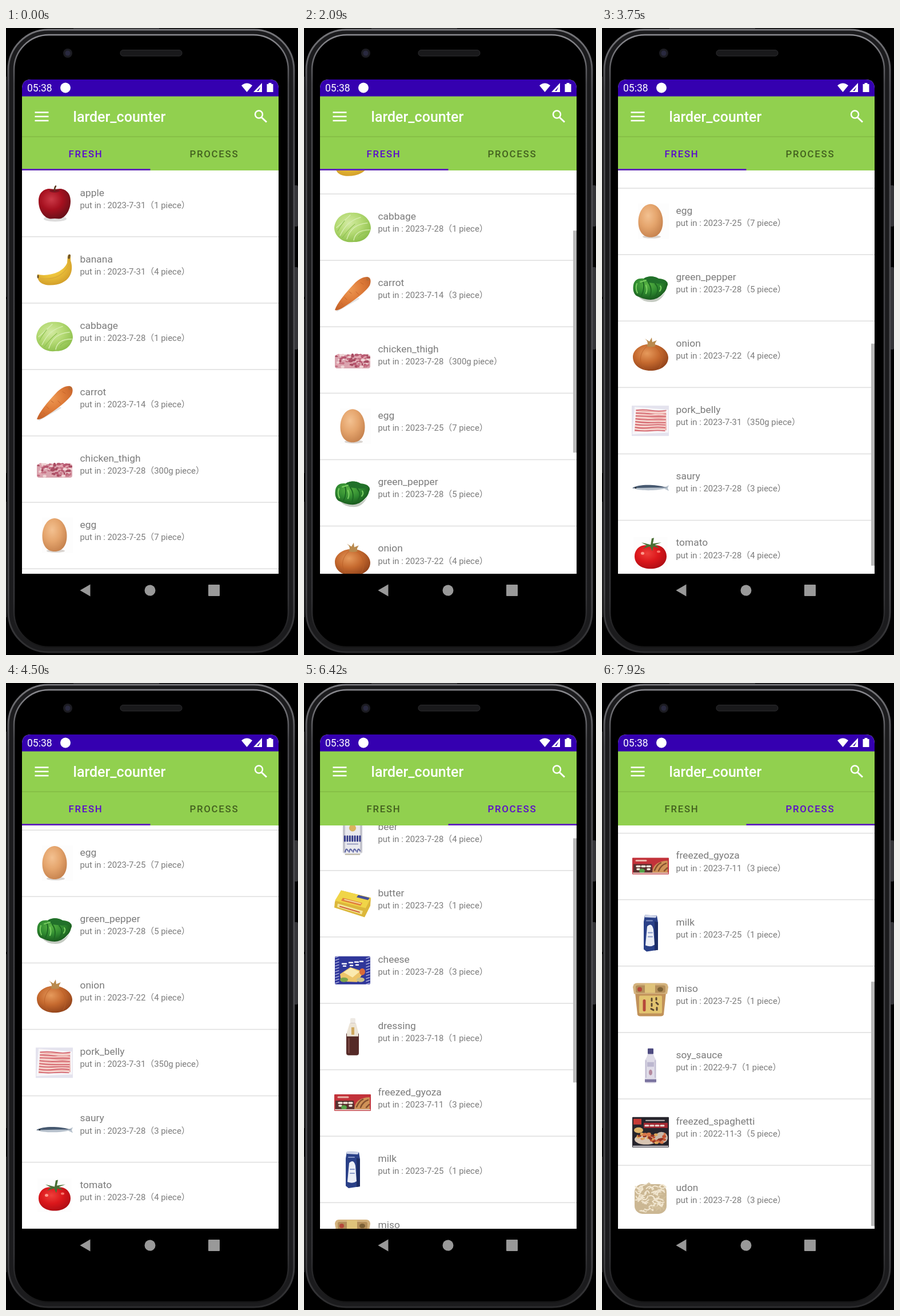
An HTML page for the animation above (8000 ms loop, 511x1096 px).

```html
<!DOCTYPE html>
<html lang="en">
<head>
<meta charset="utf-8">
<title>larder_counter</title>
<style>
  html, body { margin: 0; width: 100%; height: 100%; overflow: hidden; background: #000; }
  svg { display: block; width: 100%; height: 100%; }
  text { font-family: Roboto, "Noto Sans CJK JP", "Noto Sans CJK", sans-serif; }
  .name { font-size: 17.4px; fill: #7b7b7b; }
  .info { font-size: 14.9px; fill: #7b7b7b; }
  .tab { font-size: 16.8px; font-weight: 500; letter-spacing: 1.75px; }
</style>
</head>
<body>
<svg viewBox="0 0 511 1096" preserveAspectRatio="none">
  <defs>
    <linearGradient id="edge" x2="0" y2="1">
      <stop offset="0" stop-color="#77777b"/><stop offset=".1" stop-color="#4c4c50"/>
      <stop offset=".9" stop-color="#48484b"/><stop offset="1" stop-color="#2c2c2e"/>
    </linearGradient>
    <linearGradient id="lip" x2="0" y2="1">
      <stop offset="0" stop-color="#8b8b90"/><stop offset=".08" stop-color="#4a4a4e"/>
      <stop offset=".92" stop-color="#343437"/><stop offset="1" stop-color="#161617"/>
    </linearGradient>
    <clipPath id="listClip"><rect x="28" y="249" width="449" height="705"/></clipPath>
    <clipPath id="tabClip"><rect x="252" y="190" width="225" height="59"/></clipPath>
  </defs>

  <!-- phone -->
  <rect width="511" height="1096"/>
  <path d="M118 .8H268M.5 85V470M.5 474V778M.5 828V1030" stroke="#39393b" stroke-width="1.2"/>
  <path d="M505 275h4q2 0 2 3v66q0 3-2 3h-4zM505 418h4q2 0 2 3v138q0 3-2 3h-4z" fill="#343437"/>
  <rect x="4" y="3" width="500" height="1088" rx="70" fill="#1b1b1d" stroke="url(#edge)" stroke-width="3"/>
  <rect x="14" y="12" width="480" height="1070" rx="61" fill="#000" stroke="url(#lip)" stroke-width="2.500"/>
  <circle cx="108" cy="44" r="8" fill="#1c1c22"/>
  <circle cx="108" cy="44" r="4.500" fill="#29293f"/>
  <rect x="200" y="38.500" width="108" height="10.500" rx="5" fill="#19191b" stroke="#2c2c2f"/>
  <g fill="#999"><path d="M129.500 983l18-10.500v21z"/><circle cx="252" cy="983" r="9.500"/><rect x="354" y="973" width="20" height="20" rx="1"/></g>

  <!-- screen -->
  <path d="M28 954V106Q28 90 44 90H461Q477 90 477 106V954z" fill="#fff"/>
  <g clip-path="url(#listClip)">
    <g id="fresh"></g>
    <g id="process"></g>
    <rect id="bar" x="471" width="6" fill="#b9b9b9"/>
  </g>
  <path d="M28 120V106Q28 90 44 90H461Q477 90 477 106V120z" fill="#3500b0"/>
  <rect x="28" y="119.500" width="449" height="129.500" fill="#91d04f"/>
  <path d="M28 190H477" stroke="#86c046" stroke-width="2"/>
  <g clip-path="url(#tabClip)"><circle id="ripple" cx="352" cy="231" fill="#3a6a10"/></g>
  <rect id="indicator" y="246.300" width="224.500" height="2.500" fill="#5b0ccc"/>
  <g fill="#fff">
    <text x="37" y="111" font-size="17.500">05:38</text>
    <circle cx="104" cy="104.500" r="9"/>
    <path d="M412 100.500Q421.500 92.500 431 100.500L421.500 112z"/>
    <path d="M448 96V112H433zM445.500 103L439 110H442z" fill-rule="evenodd"/>
    <path d="M456.500 98h3v-2h5v2h3v14h-11z"/>
    <text x="117.500" y="164" font-size="25" font-weight="500">larder_counter</text>
  </g>
  <g fill="none" stroke="#fff" stroke-width="2.500">
    <path d="M50.500 147.500H74.500M50.500 154.700H74.500M50.500 162H74.500"/>
    <circle cx="442.500" cy="151" r="6.500"/><path d="M447 156l9 8.500" stroke-width="3"/>
  </g>
  <text id="freshTab" class="tab" x="109.500" y="226">FRESH</text>
  <text id="processTab" class="tab" x="321.500" y="226">PROCESS</text>
</svg>
<script>
const $ = id => document.getElementById(id);
const TOP = 249, VIEW = 704, ROW = 116.1, WIDTH = 449;

let seed = 7;
const rnd = (min, max) => {
  seed = (seed * 16807) % 2147483647;
  return min + (max - min) * seed / 2147483647;
};
const repeat = (n, draw) => Array.from({ length: n }, (_, i) => draw(i)).join('');
const path = (d, fill, stroke = 'none', width = 1) =>
  `<path d="${d}" fill="${fill}" stroke="${stroke}" stroke-width="${width}" stroke-linecap="round"/>`;
const line = (d, stroke, width) => path(d, 'none', stroke, width);
const oval = (x, y, rx, ry, fill) => `<ellipse cx="${x}" cy="${y}" rx="${rx}" ry="${ry}" fill="${fill}"/>`;
const rect = (x, y, w, h, fill, r = 0) => `<rect x="${x}" y="${y}" width="${w}" height="${h}" rx="${r}" fill="${fill}"/>`;
const shade = (id, light, mid, dark) => {
  document.querySelector('defs').insertAdjacentHTML('beforeend',
    `<radialGradient id="${id}" cx=".4" cy=".35" r=".7"><stop stop-color="${light}"/>
     <stop offset=".5" stop-color="${mid}"/><stop offset="1" stop-color="${dark}"/></radialGradient>`);
  return `url(#${id})`;
};
const speckles = (n, w, y0, y1, size, colors) => repeat(n, i =>
  oval(rnd(-w, w), rnd(y0, y1), rnd(size / 2, size), rnd(size / 3, size * .7), colors[i % colors.length]));

// Each picture is drawn around the centre of its 64 px thumbnail.
const pictures = {
  apple: oval(1, 28, 20, 5, '#ddd') +
    path('M0-22C10-28 28-23 28-3C28 16 16 28 8 28Q0 27-7 28C-18 27-28 14-28-3C-28-23-10-28 0-22Z', shade('ap', '#cc3a48', '#a6101f', '#651019')) +
    oval(0, -21, 9, 3, '#7c1420') + line('M0-22Q0-27 2-29', '#5b3a22', 2.5),
  banana: path('M23-24L28-25L28-15C35 4 26 28-8 28C-24 28-31 20-30 9C-14 13 14 8 22-11Z', shade('ba', '#f7da63', '#edc33a', '#cf9a28')) +
    line('M-27 16C0 20 18 10 26-10', '#d9a938', 1.2) + line('M25-20L26-24', '#75592a', 4) + oval(-29, 13, 1.5, 3, '#6c5125'),
  cabbage: path('M-32 2C-30-14-18-25 0-24C18-25 32-12 32 3C30 18 18 28 2 27C-15 30-32 18-32 2Z', shade('ca', '#d3eaa2', '#b4da74', '#8abd49')) +
    line('M-22 16C-14 0-6-10 14-16M-10 22C-4 4 6-4 26-6M-28 2Q-14-10-4-20M2 24C4 12 14 6 30 6', '#d6edb0', 1.4) +
    line('M-18 20Q-8 6 4-4M10 18Q16 10 26 10M-26 8Q-22 0-14-10', '#8fc253', 1.2),
  carrot: line('M-27 31L10 10', '#e3e3e3', 3) +
    path('M-31 30C-27 18-14 2 2-15C10-24 18-28 26-28C32-27 33-20 30-13C25-4 4 13-14 24Q-26 32-31 30Z', shade('cr', '#ee9a55', '#df7c39', '#c5622a')) +
    line('M-14 8l4 4M-6-2l4 3M6-2l5 5M14-18l5 3M-20 18l3 3', '#c5642c', 1) + oval(27, -24, 3, 3, '#b96c35'),
  chicken_thigh: rect(-31, -8, 62, 24, '#d9a3ae', 4) +
    speckles(110, 28, -8, 14, 4, ['#c46f82', '#efd3d4', '#b85870', '#e3a5b0', '#a94c62']),
  egg: rect(-22, -30, 54, 62, '#fdfdfd') + oval(2, 28, 16, 3, '#d9d4d0') +
    path('M0-29C12-29 21.500-15 21.500 2C21.500 19 13 29 0 29C-13 29-21.500 19-21.500 2C-21.500-15-12-29 0-29Z', shade('eg', '#f3c191', '#e5a56d', '#c5814d')),
  green_pepper: path('M-22 16Q10 30 26 8Q18 26 2 26Q-14 26-22 16Z', '#c5cbc2') +
    path('M-30-4C-28-14-20-16-12-15C-4-21 8-19 14-15C24-15 31-10 30-4C28 0 28 6 22 11C16 18 8 22 0 22C-10 22-18 18-25 15C-31 10-31 2-30-4Z', shade('gp', '#58b443', '#2f8a30', '#145019')) +
    path('M-12-15C-4-21 8-19 14-15L30-8L14-6L-4-8Z', '#21702a') +
    line('M-14-11C-10-4-12 8-16 15M-4-8C2 0 2 10-2 20M8-6C14 0 14 8 8 16', '#1d6823', 2) +
    line('M-24-6Q-27 2-23 10M-8-3Q-5 4-8 11M17-2Q20 2 16 7M-18-9L-8-12', '#7bcf62', 2),
  onion: path('M-4-16C10-19 31-8 31 7C31 22 16 30 0 30C-18 30-31 20-31 6C-31-8-14-17-4-16Z', shade('on', '#e69a5c', '#c66a2f', '#8f4119')) +
    line('M-3-15C-20-4-22 16-10 28M4-15C20-6 24 14 14 27', '#b86029', .8) +
    path('M-7-13Q-2-20-10-26L-2-21L2-28L3-20L11-23Q6-17 9-13Q0-10-7-13Z', '#b98a4e'),
  pork_belly: rect(-33, -25, 65, 53, '#e4e3ee') +
    path('M-28-23L31-18L31 22L-32 25Z', '#f7f5f8') + path('M-25-18L27-15L28 18L-28 20Z', '#eeb3ae') +
    repeat(15, i => line(`M${-25 - i * .15} ${-17 + i * 2.5}q12 ${rnd(-2, 3)} 26 ${rnd(0, 2)}t26 0`, i % 2 ? '#f8dfda' : '#d2606a', 1.6)),
  saury: path('M-32 3C-20-4 10-3 24 2L32-2L30 3L32 8L24 4C8 8-20 8-32 3Z', '#b8c2cd') +
    path('M-32 3C-20-5 10-3 24 1L30 2Q0 2-32 3Z', '#475970') + oval(-26, 2.5, 1.2, 1.2, '#222'),
  tomato: rect(-30, -28, 60, 58, '#fdfdfd') +
    path('M0-11C14-18 28-8 28 6C28 20 16 28 0 28C-16 28-28 20-28 6C-28-8-14-18 0-11Z', shade('to', '#ee3f3a', '#db171b', '#ac0d14')) +
    path('M0-14L-16-18L-7-13L-13-7L-1-11L3-3L5-11L15-8L8-14L19-18L4-16L6-26L2-25Z', '#4a7035') + oval(-14, 1, 3, 2.5, '#ff9a8d') + oval(14, -2, 3, 2, '#f8766c'),

  beer: path('M-14-32H14L17-26V28L13 32H-13L-17 28V-26Z', '#e9e9ee') + rect(-17, -26, 4, 54, '#c3c3cc') + rect(13, -26, 4, 54, '#c3c3cc') +
    oval(0, -15, 6, 6, '#d9b35e') + repeat(7, i => rect(-15 + i * 4.4, -2, 3, 11, '#343b88', 1)) + rect(-10, 12, 20, 2, '#9b9fc2') +
    repeat(4, i => line(`M${-13 + i * 7} 27q2-9 5-2`, '#5a62a2', 2)) + rect(-13, 30, 26, 2, '#b9b49f'),
  butter: path('M-20-22L32-9L31 5L21 25L-32 8L-31-2Z', '#dcb73a') + path('M-20-22L32-9L23 9L-31-4Z', '#f0d548') +
    path('M10-14L30-9L27-5L7-10Z', '#46509a') + path('M-17-9L17 0L14 5L-20-4Z', '#e2823f') +
    line('M-14-6L14 1', '#f7ecb0', 1.5) + path('M-26 1L18 14L16 20L-27 7Z', '#f3e49a') + line('M-22 6L12 16', '#cf5636', 2),
  cheese: rect(-31, -23, 62, 49, '#30379a', 2) +
    repeat(10, i => line(`M-30 ${-21 + i * 5}l6-2M24 ${-19 + i * 5}l6-2`, '#b9bbe4', 1.3)) +
    line('M-18-10h7M-6-12h6M4-13h6M13-14h5M-16-6h4M-4-7h4M6-8h4', '#f4f4ff', 2.5) +
    path('M-22 8L-4-4L20 4L8 22L-20 21Z', '#edc56a') + path('M-16 5L-3-3L12 4L0 14Z', '#faeab0') +
    oval(17, 4, 5, 6, '#d96a38') + oval(-15, 18, 7, 4, '#7da54a') + oval(14, 18, 7, 4, '#c9c08a'),
  dressing: rect(-4, -31, 9, 9, '#eeeae4', 2) + path('M-4-22H5Q6-12 11-3V30Q11 34 7 34H-7Q-11 34-11 30V-3Q-6-12-4-22Z', '#552a27') +
    path('M-5-22H6L10-6V1H-10V-6Z', '#ece4d6') + rect(-2, -15, 5, 13, '#cfa85e') + rect(-8, 4, 3, 26, '#754540'),
  freezed_gyoza: rect(-32, -14, 64, 29, '#c2323a', 1) + path('M-30-3H2L4 12H-30Z', '#59302f') +
    line('M-25-9H-8', '#e9b5a9', 3) + line('M-24 1h5M-15 1h5M-6 1h5M-23 6h3M-5 6h3', '#f2e9dc', 3.5) +
    path('M3 12Q4-8 30-9V12Z', '#cf9257') + line('M7 8Q12-3 18-5M14 9Q18-1 27-4M24 9L29 4', '#85502f', 2.5) +
    oval(-15, 9, 5, 4, '#55a349') + rect(-31, 12, 62, 2, '#e3c9c2'),
  milk: path('M-10-30L11-29L13-17V31L-7 34L-12 30V-18Z', '#2a4088') + path('M-10-30L11-29L9-25L-10-26Z', '#cfd6ea') +
    path('M7-19L13-17V31L7 32Z', '#1c2d67') + path('M-6-10Q2-18 5-5L7 22Q0 27-9 23Z', '#eceff7') +
    line('M-4 1H3M-4 8H3', '#8b9bca', 2) + line('M-7-20H3', '#8494c4', 2),
  miso: path('M-27-10H27L23 28Q22 31 18 31H-18Q-22 31-23 28Z', '#c1925a') + path('M-31-20Q-30-27-24-27H24Q30-27 31-20L29-8H-29Z', '#d3b27d') +
    rect(-26, -23, 52, 13, '#b48f5a', 3) + rect(-10, -26, 18, 16, '#dfc37a') + rect(-20, -5, 40, 31, '#e2c470', 2) +
    line('M-11 4V20', '#b5483a', 5) + line('M2 0v4M2 9v4M1 18l4 2M10-1v3M10 7l3 3M11 16v4', '#5d4830', 3) + oval(-19, -16, 4, 4, '#b5483a') + oval(17, -16, 5, 4, '#7c6136'),
  soy_sauce: rect(-5, -29, 10, 10, '#4d4a80', 1) + path('M-5-19H5Q6-14 10-8V28Q10 32 6 32H-6Q-10 32-10 28V-8Q-6-14-5-19Z', '#dfdce8') +
    rect(-10, 25, 20, 5, '#7a739f') + rect(-6, -5, 12, 8, '#bcb7cf') + oval(0, 13, 3, 5, '#b58a9f') + line('M-8-8V22M8-8V22', '#a9a3c0', 1),
  freezed_spaghetti: rect(-32, -25, 64, 53, '#26242c', 1) + rect(-30, -22, 14, 10, '#c63b37') + rect(-12, -15, 42, 9, '#a52a33') + line('M-8-19H24', '#bdb5b2', 2) +
    line('M-9-10h5M0-10h5M9-10h5M18-10h5', '#eadcd6', 3) + oval(-21, -2, 8, 5, '#dfb56c') + oval(-8, 14, 20, 9, '#d8c5b3') + oval(19, 11, 11, 10, '#c9b8a8') +
    speckles(40, 25, 4, 20, 4, ['#c5522f', '#e0a65a', '#8f3123', '#d9784a']) + rect(-31, 25, 62, 2, '#d4d1d6'),
  udon: rect(-28, -24, 56, 52, '#cbb793', 14) +
    repeat(70, i => line(`M${rnd(-27, 18)} ${rnd(-22, 24)}q${rnd(2, 9)} ${rnd(-9, 9)} ${rnd(6, 11)} ${rnd(-5, 5)}`, i % 4 ? '#f1e6d0' : '#d3c09c', 2)),
};

const lists = {
  fresh: ['apple|2023-7-31|1', 'banana|2023-7-31|4', 'cabbage|2023-7-28|1', 'carrot|2023-7-14|3', 'chicken_thigh|2023-7-28|300g',
    'egg|2023-7-25|7', 'green_pepper|2023-7-28|5', 'onion|2023-7-22|4', 'pork_belly|2023-7-31|350g', 'saury|2023-7-28|3', 'tomato|2023-7-28|4'],
  process: ['beer|2023-7-28|4', 'butter|2023-7-23|1', 'cheese|2023-7-28|3', 'dressing|2023-7-18|1', 'freezed_gyoza|2023-7-11|3',
    'milk|2023-7-25|1', 'miso|2023-7-25|1', 'soy_sauce|2022-9-7|1', 'freezed_spaghetti|2022-11-3|5', 'udon|2023-7-28|3'],
};

for (const [id, items] of Object.entries(lists)) {
  $(id).innerHTML = items.map((item, i) => {
    const [name, date, amount] = item.split('|');
    return `<g transform="translate(28 ${TOP + i * ROW})">
      <g transform="translate(57 56.5)">${pictures[name]}</g>
      <text class="name" x="101.500" y="44.500">${name}</text>
      <text class="info" x="101.500" y="65.700">put in : ${date}（${amount} piece）</text>
      <rect y="115" width="${WIDTH}" height="1.600" fill="#e0e0e0"/></g>`;
  }).join('');
}

// Keys are [step, value, power]; power > 1 makes the stretch up to that key decelerate.
const follow = (keys, k) => {
  if (k <= keys[0][0]) return keys[0][1];
  for (let i = 1; i < keys.length; i++) {
    const [k0, v0] = keys[i - 1], [k1, v1, power = 1] = keys[i];
    if (k <= k1) return v0 + (v1 - v0) * (1 - (1 - (k - k0) / (k1 - k0)) ** power);
  }
  return keys.at(-1)[1];
};
const freshScroll = [[15, 0], [16, 14], [17, 44], [18, 80], [29, 215, 1.7], [31, 215], [32, 232], [33, 262], [35, 333], [47, 572, 1.31]];
const processScroll = [[76, 0], [77, 37], [86, 225, 1.6], [89, 225], [90, 246], [91, 290], [95, 450.5, 1.3]];
const pageSlide = [[65, 0], [66, .12], [67, .5], [68, .82], [69, .96], [70, 1]];
const rippleRadius = [[64, 0], [65, 71], [68, 150]];
const rippleAlpha = [[64, 0], [65, .17], [66, .15], [69, 0]];
const freshBar = [[15, 0], [16, 1], [50, 1], [53, 0]];

function draw(ms) {
  const k = Math.floor(Math.floor(ms / 10) * 3 / 25); // 12 steps per second
  const page = follow(pageSlide, k), onProcess = k > 65;
  const scroll = follow(onProcess ? processScroll : freshScroll, k);
  const ratio = VIEW / (ROW * lists[onProcess ? 'process' : 'fresh'].length);
  const place = (id, x, y) => $(id).setAttribute('transform', `translate(${x} ${y})`);
  const set = (id, values) => { for (const key in values) $(id).setAttribute(key, values[key]); };

  place('fresh', -page * WIDTH, -follow(freshScroll, k));
  place('process', (1 - page) * WIDTH, -follow(processScroll, k));
  set('bar', { y: TOP + scroll * ratio, height: VIEW * ratio, opacity: onProcess ? +(k > 76) : follow(freshBar, k) });
  set('ripple', { r: follow(rippleRadius, k), opacity: follow(rippleAlpha, k) });
  set('indicator', { x: 28 + page * 224.5 });
  set('freshTab', { fill: onProcess ? '#43611f' : '#5b0ccc' });
  set('processTab', { fill: onProcess ? '#5b0ccc' : '#43611f' });
}

const start = performance.now();
(function tick() {
  draw((performance.now() - start) % 8000);
  requestAnimationFrame(tick);
})();
</script>
</body>
</html>
```
